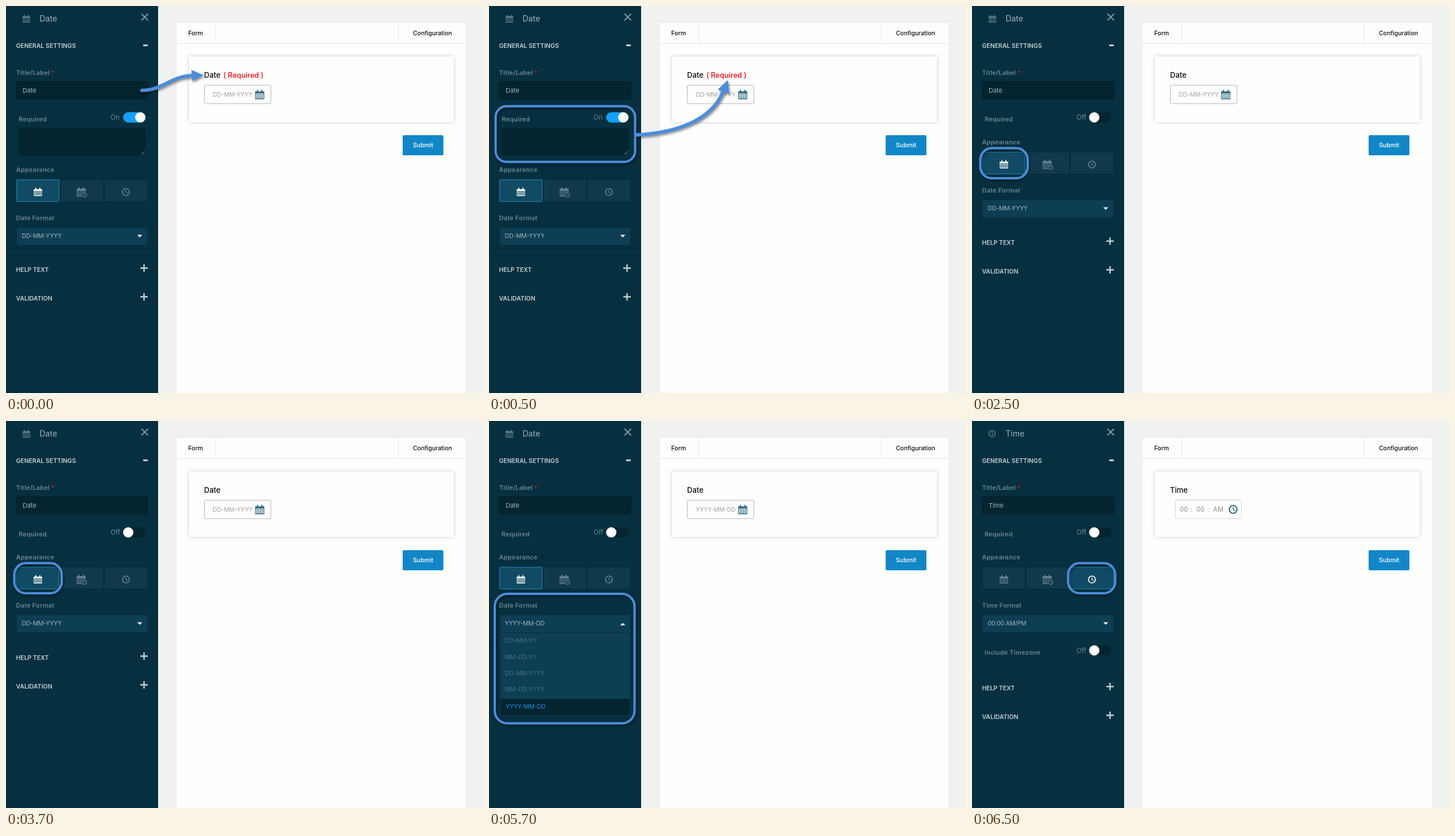
Write an HTML page that moves like this. It is 831 px wide and 674 px high and loops after 8 s.

```html
<!DOCTYPE html>
<html lang="en">
<head>
<meta charset="utf-8">
<title>Date field settings</title>
<style>
html, body { margin: 0; width: 100%; height: 100%; overflow: hidden; background: #f0f2f1; }
svg { display: block; width: 831px; height: 674px; font-family: Inter, "Open Sans", sans-serif; }
text { white-space: pre; }
</style>
</head>
<body>
<svg viewBox="0 0 831 674">
  <defs>
    <filter id="lift" x="-20%" y="-40%" width="140%" height="190%">
      <feDropShadow dx="1.5" dy="2.5" stdDeviation="2" flood-color="#000" flood-opacity=".5"/>
    </filter>
    <filter id="card" x="-5%" y="-15%" width="110%" height="130%">
      <feDropShadow dx="0" dy="0" stdDeviation="3.5" flood-color="#000" flood-opacity=".2"/>
    </filter>
  </defs>
  <g id="stage"></g>
</svg>
<script>
const LOOP = 8000, STARTS = [0, 500, 2500, 4500, 6500];
const BLUE = '#4e8dd9', TEAL = '#346b83', LABEL = '#6b858f', HEAD = '#c3d0d4', DARK = '#04242f';

// y is the middle of the capitals
const text = (x, y, str, size, fill, weight = 400, gap = 0) =>
  `<text x="${x}" y="${y + size * 0.364}" font-size="${size}" fill="${fill}" font-weight="${weight}" letter-spacing="${gap}">${str}</text>`;
const rect = (x, y, w, h, fill, r = 0, extra = '') =>
  `<rect x="${x}" y="${y}" width="${w}" height="${h}" fill="${fill}" rx="${r}" ${extra}/>`;
const line = (d, color, width = 1, extra = '') =>
  `<path d="${d}" fill="none" stroke="${color}" stroke-width="${width}" ${extra}/>`;
const shape = (d, fill) => `<path d="${d}" fill="${fill}"/>`;
const disc = (x, y, r, fill) => `<circle cx="${x}" cy="${y}" r="${r}" fill="${fill}"/>`;
const label = (x, y, str) => text(x, y, str, 11, LABEL, 600, 0.2);
const heading = (y, str) => text(17.5, y, str, 10.5, HEAD, 600);
const format = (x, y, str, fill) => text(x, y, str, 10.5, fill, 400, -0.2);

// centred on (x, y), 14 units wide at scale 1
function calendar(x, y, color, scale = 1) {
  let s = line('M-6.5-4.5h13v11h-13z', color, 1.1) + rect(-7, -5, 14, 3.2, color) +
    line('M-3.5-7.5v3M3.5-7.5v3', color, 1.8);
  for (let row = 0; row < 3; row++)
    for (let col = 0; col < 4; col++)
      s += rect(-5 + col * 2.7, -0.9 + row * 2.5, 1.9, 1.6, color);
  return `<g transform="translate(${x} ${y}) scale(${scale})">${s}</g>`;
}

const clock = (x, y, r, color, width) =>
  `<circle cx="${x}" cy="${y}" r="${r}" fill="none" stroke="${color}" stroke-width="${width}"/>` +
  line(`M${x} ${y - r * 0.6}V${y}l${r * 0.45} ${r * 0.4}`, color, width * 0.8);

const calendarClock = (x, y, color) => calendar(x - 1, y, color, 1.1) +
  disc(x + 5, y + 5, 5, '#10394c') + clock(x + 5, y + 5, 3.7, color, 1.2);

function toggle(y, on) {
  return text(182, y, on ? 'On' : 'Off', 11.7, LABEL) +
    rect(204, y - 9, 39, 18, on ? '#14a0fb' : DARK, 9) +
    disc(on ? 234 : 213, y, 9, '#fff');
}

const callout = (x, y, w, h, r) =>
  rect(x, y, w, h, 'none', r, `stroke="${BLUE}" stroke-width="4" filter="url(#lift)"`);
const arrow = (curve, head, width) =>
  `<g filter="url(#lift)">${line(curve, BLUE, width, 'stroke-linecap="round"')}${shape(head, BLUE)}</g>`;

function appearance(y, picked) {
  let s = label(17.5, y - 17, 'Appearance');
  [18, 94, 171].forEach((x, i) => {
    const on = i === picked, color = on ? '#fff' : '#678391';
    s += rect(x + 0.5, y + 0.5, i ? 75 : 74, 38, on ? '#114b63' : '#10394c', 1,
      `stroke="${on ? '#1d86bd' : '#0a2a38'}"`);
    s += [calendar, calendarClock, (a, b, c) => clock(a, b, 6, c, 1.7)][i]([55.5, 132, 209][i], y + 22, color);
  });
  return s;
}

function select(y, value, open) {
  return rect(18.5, y + 0.5, 228, 31, '#0e3e53', 1, 'stroke="#092d3c"') +
    format(27.5, y + 15.5, value, '#a3b5bd') +
    shape(open ? `M228.5 ${y + 19}h9l-4.5-4.5z` : `M228.5 ${y + 13.5}h9l-4.5 4.5z`, '#e6ecee');
}

function options() {
  const names = ['DD-MM-YY', 'MM-DD-YY', 'DD-MM-YYYY', 'MM-DD-YYYY'];
  return rect(18.5, 368.5, 228, 145, '#0e3e53', 1, 'stroke="#092d3c"') +
    names.map((n, i) => format(27.5, 382.5 + i * 28.2, n, '#467082')).join('') +
    rect(20, 484, 225, 28, DARK) + format(29, 497.5, 'YYYY-MM-DD', '#1b8ff0');
}

function section(y, name) {
  return heading(y, name) + line(`M234 ${y - 3}h13M240.5 ${y - 9.5}v13`, HEAD, 2.4);
}

function sidebar(scene) {
  const required = scene < 2, time = scene === 4, open = scene === 3;
  const name = time ? 'Time' : 'Date', shift = required ? 0 : -48;
  const fold = time ? 440 : required ? 434 : 387;
  let s = rect(0, 0, 265, 674, '#063040') +
    (time ? clock(35, 22, 5.4, '#6b858f', 1.5) : calendar(35.5, 22.5, '#5f7c88', 0.92)) +
    text(58.5, 22, name, 14, '#9fb2ba') +
    line('M236 13.5l11.5 11.5M247.5 13.5l-11.5 11.5', '#8299a3', 1.9) +
    heading(69, 'GENERAL SETTINGS') + line('M239 68.5h8', HEAD, 3) +
    label(17.5, 115.5, 'Title/Label') + text(78.5, 116, '*', 11, '#c0162c', 600) +
    rect(17.5, 131.5, 230, 31, DARK, 3, 'stroke="#042029"') +
    text(29, 147, name, 11, '#a3b5bd') +
    label(22, 197, 'Required') + toggle(194, required);
  if (required)
    s += rect(22, 212, 221, 48.5, DARK, 3) + line('M235.5 258.5l6-6M239 258.5l2.5-2.5', '#84959c', 1);
  s += line(`M0 ${fold + 0.5}h265`, '#04222d', 1.2);
  if (!open) s += section(fold + 25.5, 'HELP TEXT') + section(fold + 75.5, 'VALIDATION');
  s += appearance(302 + shift, time ? 2 : 0) +
    label(17.5, 369 + shift, name + ' Format') +
    select(385 + shift, time ? '00:00 AM/PM' : open ? 'YYYY-MM-DD' : 'DD-MM-YYYY', open);
  if (open) s += options();
  if (time) s += label(22, 402.5, 'Include Timezone') + toggle(399.5, false);
  return s;
}

function form(scene) {
  const time = scene === 4, black = '#0c0c0c', grey = '#8d8d8d';
  let s = rect(296.5, 28.5, 505, 660, '#fefefd', 0, 'stroke="#e6e8e7"') +
    line('M297 65.5h505M365.5 29v36M683.5 29v36', '#e4e6e5') +
    text(317.5, 47.5, 'Form', 10.5, black, 500) +
    text(709, 47, 'Configuration', 10.4, black, 500) +
    rect(319, 88, 461, 114, '#fefefd', 0, 'filter="url(#card)"') +
    text(345, 120, time ? 'Time' : 'Date', 13, black, 500);
  if (scene < 2) s += text(378.5, 120, '( Required )', 12.7, '#f50d0d', 500);
  if (time) {
    s += rect(354.5, 138, 115, 32, '#fefefd', 2, 'stroke="#d2d4d4"') + clock(455, 154, 6.8, TEAL, 2);
    [[362, '00'], [381, ':'], [391, '00'], [410.5, ':'], [420, 'AM']]
      .forEach(([x, part]) => s += text(x, 153.5, part, 11.2, grey));
  } else {
    s += rect(345.5, 138, 116, 32, '#fefefd', 2, 'stroke="#b2b4b4"') +
      format(360, 154, scene === 3 ? 'YYYY-MM-DD' : 'DD-MM-YYYY', '#a2a2a2') +
      calendar(442, 154.5, TEAL, 1.13);
  }
  return s + rect(691, 225, 71, 35, '#1287c8', 2) + text(709, 242.5, 'Submit', 10.6, '#fff', 500);
}

const MARKS = [
  () => arrow('M237 147C276 146 284 123 326 121', 'M323 111.5L344.5 120.5L324.5 130.5z', 6),
  () => callout(11.5, 174.5, 243, 97, 19) +
    arrow('M257 224.5C320 221 386 203 408 149', 'M416 129L398.5 145.5L418.5 153z', 6),
  () => callout(14.5, 247.5, 82.5, 52.5, 20),
  () => callout(10, 301, 243.5, 225.5, 22),
  () => callout(167.5, 247.5, 82, 52.5, 20)
];

const stage = document.getElementById('stage');
let shown = -1;
function draw() {
  const t = performance.now() % LOOP;
  const scene = STARTS.filter(start => start <= t).length - 1;
  if (scene !== shown) {
    stage.innerHTML = form(scene) + sidebar(scene) + MARKS[scene]();
    shown = scene;
  }
  requestAnimationFrame(draw);
}
draw();
</script>
</body>
</html>
```
